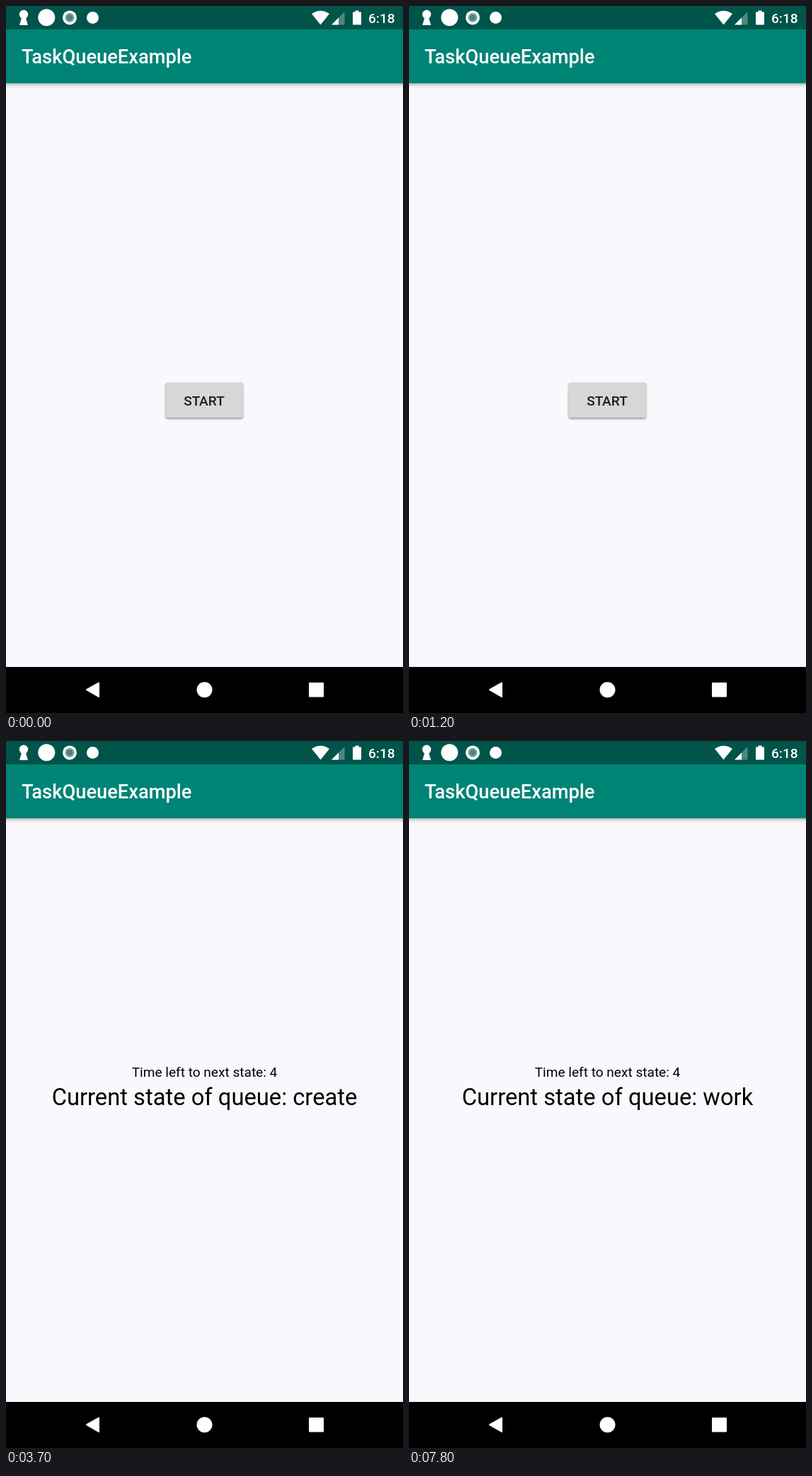
Recreate the animation shown at these times as an HTML page. Size 561x998 px, loop 8000 ms.

```html
<!DOCTYPE html>
<html lang="en">
<head>
<meta charset="utf-8">
<title>TaskQueueExample</title>
<style>
  html, body { margin: 0; width: 100%; height: 100%; overflow: hidden; background: #faf8fc; }
  svg { display: block; width: 100%; height: 100%; }
  text { font-family: Roboto, sans-serif; font-size: 19.09px; }
  .medium { font-weight: 500; }
  .mid { text-anchor: middle; }
</style>
</head>
<body>
<svg viewBox="0 0 561 998">
  <defs>
    <linearGradient id="shade" x2="0" y2="1">
      <stop offset="0" stop-color="#000" stop-opacity=".3"/>
      <stop offset=".4" stop-color="#000" stop-opacity=".11"/>
      <stop offset="1" stop-color="#000" stop-opacity="0"/>
    </linearGradient>
    <filter id="blur" x="-10%" y="-20%" width="120%" height="140%">
      <feGaussianBlur stdDeviation="1.5"/>
    </filter>
    <clipPath id="face"><rect x="225.5" y="531.5" width="109.5" height="49.5" rx="2.7"/></clipPath>
  </defs>

  <rect width="561" height="998" fill="#faf8fc"/>

  <rect y="109" width="561" height="7" fill="url(#shade)"/>
  <rect y="33" width="561" height="76" fill="#008475"/>
  <rect width="561" height="33" fill="#00544a"/>
  <text class="medium" x="22" y="81" fill="#fff" style="font-size:27.27px">TaskQueueExample</text>

  <g fill="#fff">
    <circle cx="25" cy="11.8" r="6.2"/>
    <path d="M22.5 15h5L31 27H19Z"/>
    <circle cx="57.3" cy="16.3" r="12"/>
    <circle cx="90" cy="16.4" r="10"/>
    <circle cx="90" cy="16.4" r="6.6" fill="#83aaa4"/>
    <circle cx="90" cy="16.4" r="4.4" fill="#4a857c"/>
    <circle cx="122.5" cy="16.5" r="8.5"/>
    <path d="M432 11Q444.5 2.5 457 11L444.5 26.5Z"/>
    <path d="M460 26.5L478.5 8V26.5Z" opacity=".3"/>
    <path d="M460 26.5L470 16.5V26.5Z"/>
    <path d="M490 8.5h3.5V6.5h5V8.5H502V26.5H490Z"/>
    <text class="medium" x="512" y="24">6:18</text>
  </g>

  <g id="button">
    <rect x="225.5" y="533" width="109.5" height="50" rx="3" opacity=".38" filter="url(#blur)"/>
    <g clip-path="url(#face)">
      <rect x="225" y="531" width="111" height="51" fill="#d6d7d7"/>
      <circle id="ripple" cx="280" cy="556" opacity=".12"/>
    </g>
    <text class="medium mid" x="280" y="563.5" fill="#1b1b1b">START</text>
  </g>

  <g id="status">
    <text id="left" class="mid" x="280.5" y="473.7"></text>
    <text id="state" class="mid" x="280.5" y="514" style="font-size:32.73px"></text>
  </g>

  <rect y="933" width="561" height="65"/>
  <g fill="#fff" stroke="#fff" stroke-linejoin="round" stroke-width="2">
    <path d="M114 965.2L131 955.5V975Z"/>
    <circle cx="280.5" cy="965.2" r="10"/>
    <rect x="429" y="956" width="19" height="18.5"/>
  </g>
</svg>
<script>
const LOOP = 8000, PRESS = 1450, START = 1650, WORK = 6650;
const TICKS = [START, 2650, 3700, 4650, 5650, WORK, 7700];

const el = id => document.getElementById(id);
const button = el('button'), ripple = el('ripple'), status_ = el('status');
const left = el('left'), state = el('state');

const show = (node, on) => node.setAttribute('display', on ? 'inline' : 'none');
const setText = (node, s) => { if (node.textContent !== s) node.textContent = s; };

function draw(t) {
  const running = t >= START;
  show(button, !running);
  show(status_, running);

  const p = Math.max(0, Math.min(1, (t - PRESS) / (START - PRESS)));
  ripple.setAttribute('r', 62 * (1 - (1 - p) ** 2));

  if (!running) return;
  const working = t >= WORK;
  const begun = working ? WORK : START;
  const passed = TICKS.filter(k => k > begun && k <= t).length;
  setText(left, 'Time left to next state: ' + ((working ? 5 : 6) - passed));
  setText(state, 'Current state of queue: ' + (working ? 'work' : 'create'));
}

const t0 = performance.now();
function frame() {
  draw((performance.now() - t0) % LOOP);
  requestAnimationFrame(frame);
}
frame();
</script>
</body>
</html>
```
